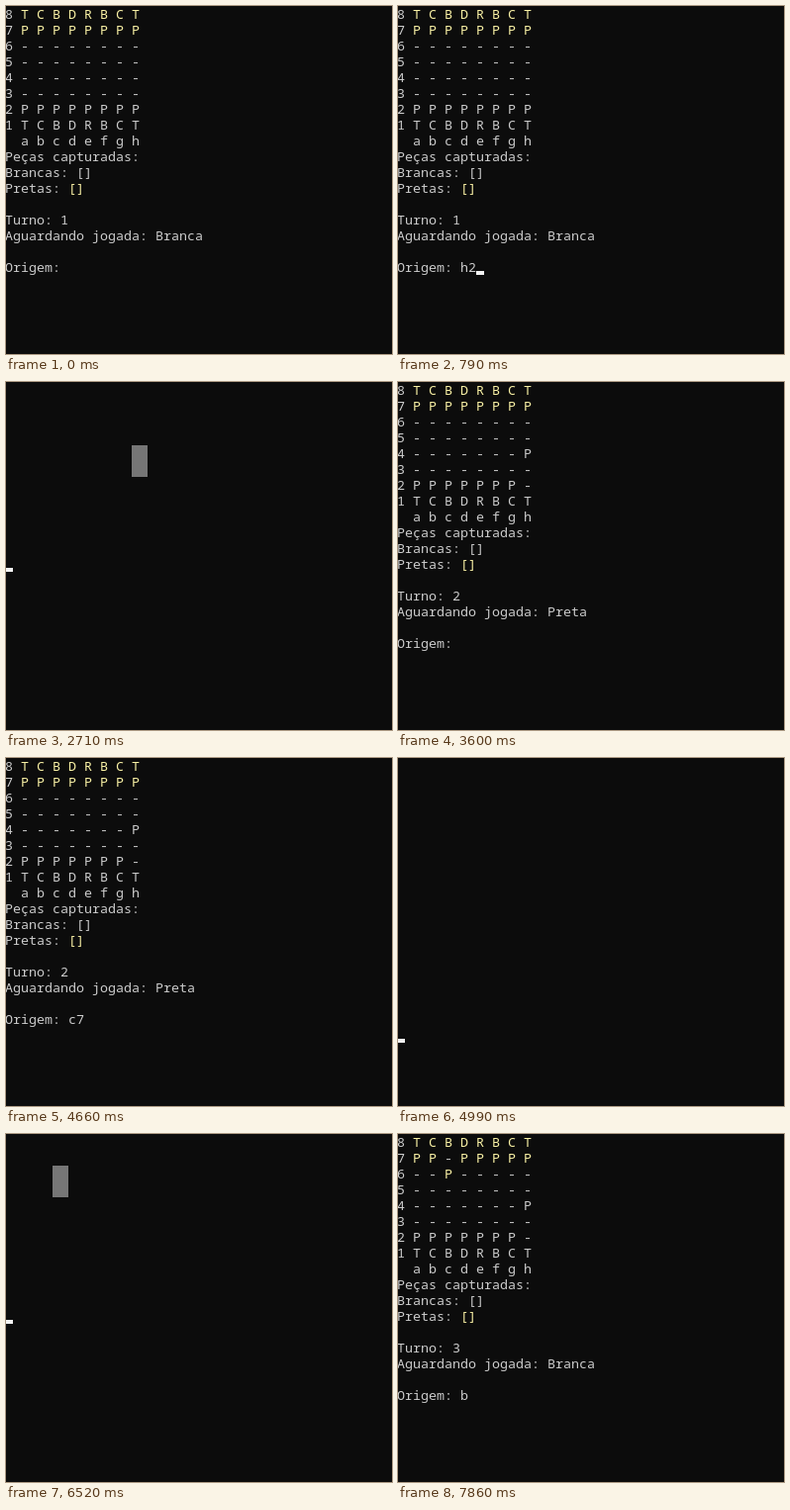
An HTML page with a canvas that plays this animation: 390x352 px, repeating every 8 s.

```html
<!DOCTYPE html>
<html lang="pt">
<head>
<meta charset="utf-8">
<title>Xadrez no console</title>
<style>
  html, body { margin: 0; width: 100%; height: 100%; overflow: hidden; background: #0c0c0c; }
  canvas { display: block; }
</style>
</head>
<body>
<canvas id="screen" width="390" height="352"></canvas>
<script>
const LOOP = 8000;
const CELL = 8, LINE = 16, LEFT = -1, BASELINE = 13;
const COLORS = { back: '#0c0c0c', text: '#cccccc', black: '#f9f1a5', mark: '#767676', cursor: '#f3f3f3' };
const BACK_RANK = 'TCBDRBCT', PAWNS = 'PPPPPPPP', EMPTY = '--------';

const boards = {
  start:  [BACK_RANK, PAWNS, EMPTY, EMPTY, EMPTY, EMPTY, PAWNS, BACK_RANK],
  white:  [BACK_RANK, PAWNS, EMPTY, EMPTY, '-------P', EMPTY, 'PPPPPPP-', BACK_RANK],
  black:  [BACK_RANK, 'PP-PPPPP', '--P-----', EMPTY, '-------P', EMPTY, 'PPPPPPP-', BACK_RANK]
};

// A mark is [file, first rank row]; it always covers two squares.
const origin = (board, turn, player) => ({ board, turn, player, prompt: 'Origem: ', row: 16 });
const target = (board, mark) => ({ board, mark, prompt: 'Destino: ', row: 10 });
const wiped = (row, mark) => ({ mark, prompt: '', row });

const turn1 = origin(boards.start, 1, 'Branca');
const target1 = target(boards.start, [7, 4]);
const turn2 = origin(boards.white, 2, 'Preta');
const target2 = target(boards.white, [2, 2]);
const turn3 = origin(boards.black, 3, 'Branca');

// [start ms, view, typed input, cursor visible]
const steps = [
  [0, turn1, '', false],
  [130, turn1, '', true],
  [460, turn1, 'h', true],
  [660, turn1, 'h', false],
  [790, turn1, 'h2', true],
  [1200, turn1, 'h2', false],
  [1330, turn1, 'h2\n', true],
  [1390, target1, '', true],
  [1790, target1, 'h', true],
  [2120, target1, 'h4', true],
  [2250, target1, 'h4', false],
  [2710, wiped(10, [7, 4]), '\n', true],
  [2780, turn2, '', false],
  [3050, turn2, '', true],
  [3600, turn2, '', false],
  [3670, turn2, 'c', true],
  [4130, turn2, 'c', false],
  [4390, turn2, 'c7', true],
  [4660, turn2, 'c7', false],
  [4990, wiped(16), '\n', true],
  [5060, target2, '', true],
  [5520, target2, 'c', true],
  [5720, target2, 'c', false],
  [5920, target2, 'c6', true],
  [6250, target2, 'c6', false],
  [6520, wiped(10, [2, 2]), '\n', true],
  [6600, turn3, '', false],
  [7460, turn3, 'b', true],
  [7860, turn3, 'b', false]
];

const ctx = document.getElementById('screen').getContext('2d', { alpha: false });

function print(text, col, row, color = COLORS.text) {
  ctx.fillStyle = color;
  [...text].forEach((char, i) => ctx.fillText(char, LEFT + (col + i) * CELL, row * LINE + BASELINE));
}

function drawBoard(board) {
  board.forEach((rank, row) => {
    print(String(8 - row), 0, row);
    [...rank].forEach((piece, file) => {
      const isBlack = piece !== '-' && row < 4;
      print(piece, 2 + file * 2, row, isBlack ? COLORS.black : COLORS.text);
    });
  });
  print('a b c d e f g h', 2, 8);
}

function drawStatus({ turn, player }) {
  print('Peças capturadas:', 0, 9);
  print('Brancas: []', 0, 10);
  print('Pretas: ', 0, 11);
  print('[]', 8, 11, COLORS.black);
  print('Turno: ' + turn, 0, 13);
  print('Aguardando jogada: ' + player, 0, 14);
}

function draw([, view, input, cursorOn]) {
  ctx.font = '13.333px "Noto Sans Mono", "DejaVu Sans Mono", monospace';
  ctx.fillStyle = COLORS.back;
  ctx.fillRect(0, 0, 390, 352);
  if (view.mark) {
    const [file, row] = view.mark;
    ctx.fillStyle = COLORS.mark;
    ctx.fillRect(LEFT + (2 + file * 2) * CELL, row * LINE, 2 * CELL, 2 * LINE);
  }
  if (view.board) drawBoard(view.board);
  if (view.turn) drawStatus(view);

  const entered = input.endsWith('\n');
  const line = view.prompt + input.trim();
  print(line, 0, view.row);
  if (cursorOn) {
    const col = entered ? 0 : line.length;
    const row = view.row + (entered ? 1 : 0);
    ctx.fillStyle = COLORS.cursor;
    ctx.fillRect(LEFT + col * CELL, row * LINE + 12, CELL, 4);
  }
}

const startTime = performance.now();
function tick() {
  const time = (performance.now() - startTime) % LOOP;
  draw(steps.findLast(([start]) => start <= time));
  requestAnimationFrame(tick);
}
tick();
</script>
</body>
</html>
```
